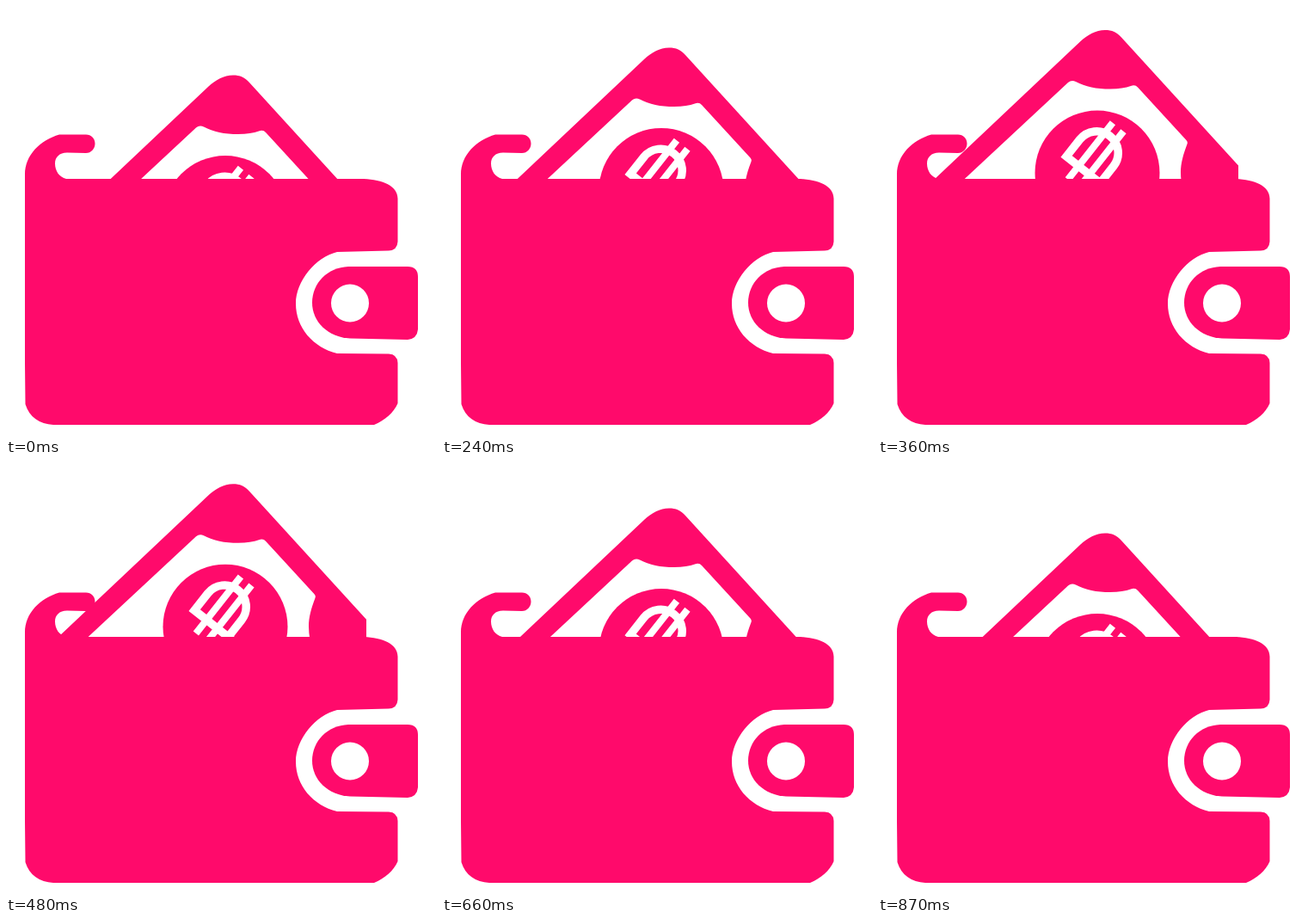
An HTML page that plays this animation: 500 px wide and 500 px high, repeating every 930 ms.

```html
<!DOCTYPE html>
<html lang="en">
<head>
<meta charset="utf-8">
<title>Wallet</title>
<style>
html, body { margin: 0; width: 100%; height: 100%; overflow: hidden; background: #fff; }
svg { display: block; width: 100vw; height: 100vh; }
.pink { fill: #ff0a6b; }
.white { fill: #fff; }
.sign { fill: none; stroke: #fff; }
</style>
</head>
<body>
<svg viewBox="0 0 500 500">
  <clipPath id="slot"><path d="M0 0H500V204H0Z"/></clipPath>
  <g clip-path="url(#slot)">
    <g id="bill">
      <path class="pink" d="M20 239L235 36C244 28 253 22.500 264 22.500C272 22.500 278 25 283 31L419 180V250H20Z"/>
      <path class="white" d="M54 239L221 83.500Q225 80 230 82.500C241 88.500 254 91 270 91C280 91 288 89.500 294 87.500Q299 85.500 302 89L358.500 150.500Q360.500 152.500 359.500 155C355 167 352 177 352 188C352 200 355 212 358 225V239Z"/>
      <circle class="pink" cx="255" cy="188.500" r="72.500"/>
      <g class="sign" transform="translate(220.300 170.300) rotate(-51.700)">
        <path stroke-width="9.500" d="M0 95V-1.500H25A25 25 0 0 1 25 48.500H0"/>
        <path stroke-width="8" d="M-20 16.500H64M-20 32.500H64"/>
      </g>
    </g>
  </g>
  <path class="pink" d="M22 196C22 173 40 156 62 149.500H93C99 149.500 103.500 154 103.500 160C103.500 166 99 171 93 171L71 170.500C62 170.500 57 176 57 183C57 192 62 199 70 201H416C438 202 455.500 209 455.500 224V274Q455 284 445 284.500L385 286C360 292 337 320 337 346C337 374 357 397 385 404L445 404.500Q455 405 455.500 415V462C451 473 440 482 428 487H55C39 486 27 478 22.500 463L22 416Z"/>
  <path class="pink" d="M398 303H467Q479 303 479 315V376Q478 387 467 388L400 386.500C374 385 356 367 356 345C356 322 374 304 398 303Z"/>
  <circle class="white" cx="400" cy="345.500" r="22"/>
</svg>
<script>
const LOOP = 930, STEP = 30, PEAK = 450, END = 870, TRAVEL = 58;
const bill = document.getElementById("bill");
const ease = p => (1 - Math.cos(Math.PI * p)) / 2;

function lift(t) {
  if (t >= END) return 0;
  return TRAVEL * (t < PEAK ? ease(t / PEAK) : ease((END - t) / (END - PEAK)));
}

function draw(now) {
  const t = Math.floor((now % LOOP) / STEP) * STEP;
  bill.setAttribute("transform", `translate(0 ${(TRAVEL - lift(t)).toFixed(2)})`);
}

const start = performance.now();
function tick() {
  draw(performance.now() - start);
  requestAnimationFrame(tick);
}
tick();
</script>
</body>
</html>
```
